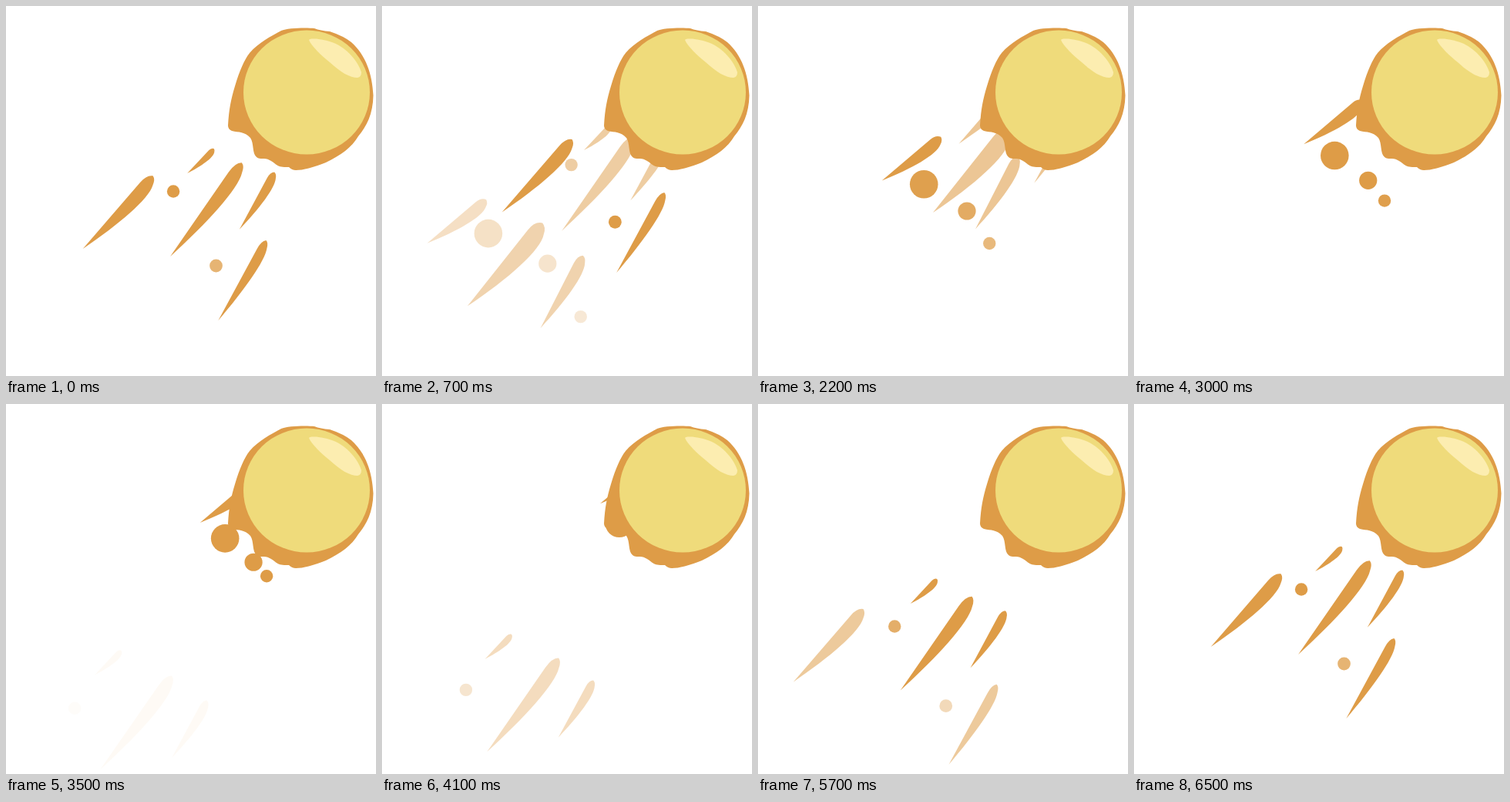
An HTML page that plays this animation: 480x480 px, repeating every 6600 ms.

```html
<!DOCTYPE html>
<html lang="en">
<head>
<meta charset="utf-8">
<title>Fireball</title>
<style>
html, body { margin: 0; width: 100%; height: 100%; overflow: hidden; background: #fff; }
svg { display: block; width: 100vw; height: 100vh; }
</style>
</head>
<body>
<svg viewBox="0 0 480 480">
  <g id="trail" fill="#de9c47"></g>
  <path fill="#de9c47" d="M288 155C289 135 292 120 297 104C303 84 309 70 316 61C327 48 344 39 357 32C365 28 392 28 400 29Q408 32 420 33Q438 39 448 47C467 64 475 88 476.500 116C476 140 468 156 457 169C449 183 434 194 415 203Q390 213 376 213Q371 213 367 209C350 210 351 204 342 200C335 196 330 200 325 196C319 191 322 178 317 171C310 163 302 164 293 162Q288 160 288 155Z"/>
  <ellipse cx="390" cy="112" rx="82" ry="80.500" fill="#efdb7b"/>
  <path fill="#fcedb0" d="M393 44C396 41 414 43 428 49C446 58 458 75 461 86Q461 92 456 93C446 93 434 86 420 73C410 65 396 52 393 44Z"/>
</svg>
<script>
const trail = document.getElementById('trail');
const STEP = 100, FRAMES = 66, CYCLE = 64;
const LIFE = 44, FADE_OUT = 14;
const parts = [];

const clamp = v => Math.min(1, Math.max(0, v));
const mix = (a, b, k) => a + (b - a) * k;
// Gentle speed-up in the middle of the flight
const ease = k => k - Math.sin(2 * Math.PI * k) / 25;

function add(tag, attr, value, angle, flight) {
  const el = document.createElementNS('http://www.w3.org/2000/svg', tag);
  el.setAttribute(attr, value);
  trail.append(el);
  parts.push({ el, angle, ...flight });
}

// Tail tip at the origin, straight upper edge, bulging lower edge
function streak(len, width, angle, flight) {
  const at = (u, v) => `${u * len} ${v * width} `;
  const d = 'M0 0L' + at(.87, 0) + 'Q' + at(.97, 0) + at(1, .45) +
    'Q' + at(.99, .8) + at(.93, .95) + 'C' + at(.8, 1.45) + at(.42, .95) + '0 0';
  add('path', 'd', d, -angle, flight);
}

const drop = (radius, flight) => add('circle', 'r', radius, 0, flight);

// fadeIn is a length in steps; fadeOut is the age at which fading begins
const flights = (start, fadeOut) => (from, to, fadeIn, out = fadeOut) =>
  ({ start, from, to, fadeIn, fadeOut: out });

const early = flights(0, Infinity);
streak(95, 14, 40.3, early([24.5, 335], [297, 118], 22));
streak(145, 20.5, 51.6, early([72, 430], [382, 106], 16, 16));
streak(109, 13.5, 62.9, early([180, 461], [384, 118], 16, 16));
drop(18.3, early([112, 316.5], [318.5, 146], 23));
drop(11.6, early([196, 357], [346, 175], 26));
drop(8.2, early([243.5, 435], [357, 181], 31));

const middle = flights(34, 30);
streak(47, 7.5, 47, middle([112, 355], [283.5, 163], 20));
streak(153, 15.5, 55.3, middle([120, 478], [249.5, 265], 20));
streak(87, 10.5, 61.7, middle([213, 463], [338, 222], 20));
drop(8.2, middle([86, 398.5], [268.5, 178.5], 27));

const late = flights(48, 32);
streak(131, 15.5, 49.2, late([4, 396], [291, 153], 15));
streak(121, 11.5, 61.6, late([226, 514], [374, 196], 15));
drop(8.4, late([221.5, 434], [374.5, 143], 21, Infinity));

function draw(now) {
  let step = Math.floor(now / STEP) % FRAMES;
  if (step >= 49) step--; // one held beat
  for (const { el, angle, start, from, to, fadeIn, fadeOut } of parts) {
    const age = (step - start + CYCLE) % CYCLE;
    const k = ease(age / LIFE);
    const x = mix(from[0], to[0], k), y = mix(from[1], to[1], k);
    const shown = age > LIFE ? 0 : clamp(age / fadeIn) * clamp(1 - (age - fadeOut) / FADE_OUT);
    el.setAttribute('transform', `translate(${x} ${y}) rotate(${angle})`);
    el.setAttribute('opacity', shown);
  }
}

const begin = performance.now();
function tick() {
  draw(performance.now() - begin);
  requestAnimationFrame(tick);
}
tick();
</script>
</body>
</html>
```
